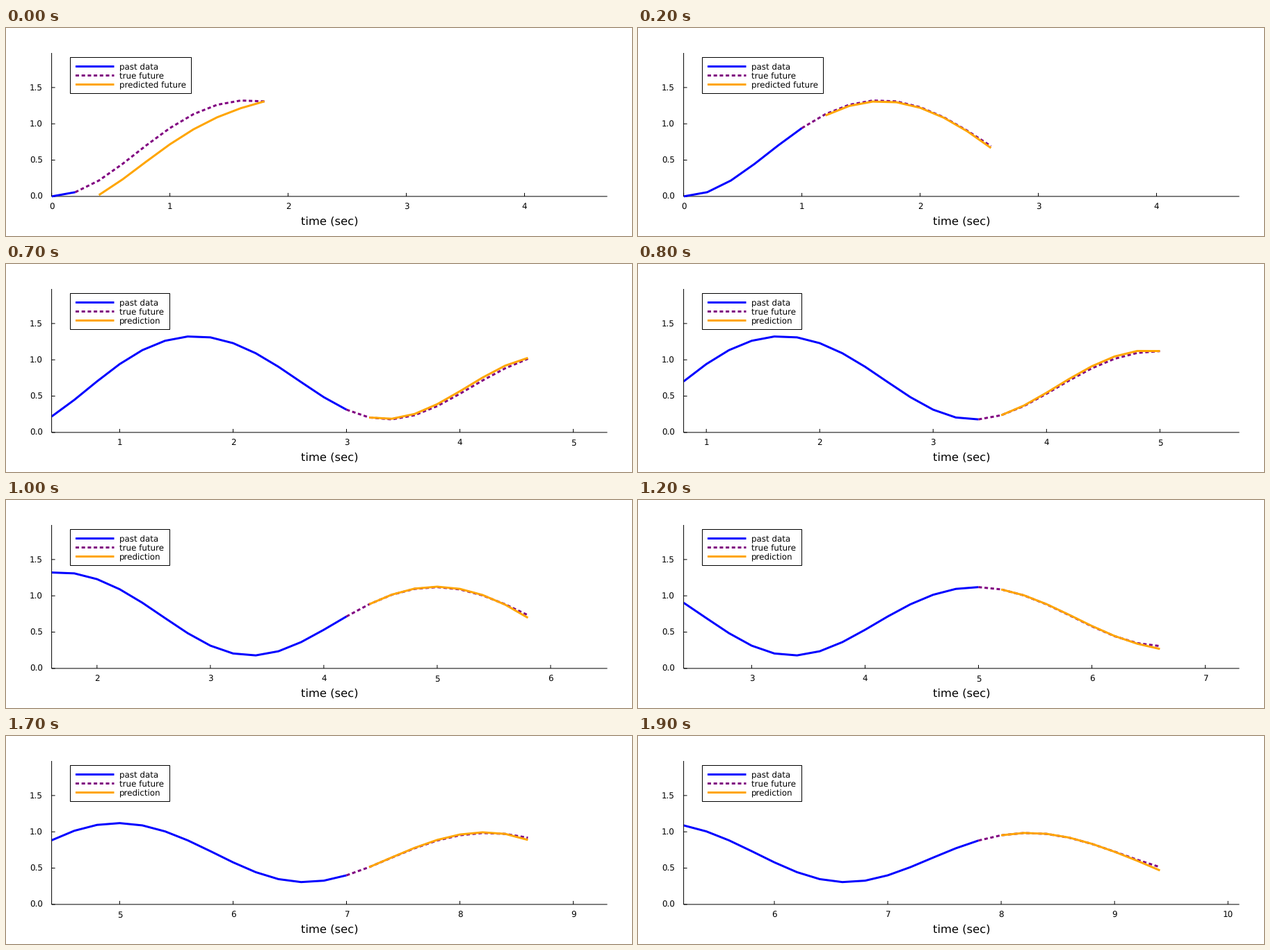
These frames come from a looping animation (900 px wide and 300 px high, 2 s). A matplotlib script:

```python
import math
import numpy as np
import matplotlib.pyplot as plt
from matplotlib.animation import FuncAnimation
from matplotlib.patches import Rectangle

W, H, DPI = 900, 300, 100
FRAMES, INTERVAL = 20, 100
LEFT, RIGHT, TOP, BASE = 65.6, 864.5, 36, 242.9
UNIT = 104.7            # pixels per unit of y
DT, AHEAD = 0.2, 8      # sample step and samples forecast
BLUE, PURPLE, ORANGE = "#0000ff", "#800080", "#ffa500"


def pt(pixels):
    return pixels * 72 / DPI


def swing(count, torque=3.0, gravity=4.905, drag=0.2, sub=20):
    """Damped pendulum starting at rest under a constant torque (RK4)."""
    def rate(s):
        return np.array([s[1], torque - gravity * math.sin(s[0]) - drag * s[1]])

    h = DT / sub
    state, angles = np.zeros(2), [0.0]
    for _ in range(count - 1):
        for _ in range(sub):
            a = rate(state)
            b = rate(state + h / 2 * a)
            c = rate(state + h / 2 * b)
            d = rate(state + h * c)
            state = state + h / 6 * (a + 2 * b + 2 * c + d)
        angles.append(state[0])
    return np.array(angles)


truth = swing(2 * FRAMES + AHEAD)
times = DT * np.arange(len(truth))


def forecast_error(i, now):
    """Poor first guess that quickly gives way to a small drift and end drop."""
    u = np.linspace(0, 1, AHEAD)
    guess = -(0.2 + 0.1 * u) * (1 - u**3)
    phase = 2 * math.pi * (now - 3) / 3.28
    drift = 0.061 * math.exp(-0.18 * now) * (1 + 0.75 * math.cos(phase))
    untrained = 0.3**i
    return untrained * guess + (1 - untrained) * (drift * u - 0.05 * u**7)


plt.rcParams["font.family"] = "DejaVu Sans"
plt.rcParams["text.hinting"] = "none"
fig = plt.figure(figsize=(W / DPI, H / DPI), dpi=DPI, facecolor="white")
ax = fig.add_axes([0, 0, 1, 1])
ax.set_xlim(0, W)
ax.set_ylim(H, 0)
ax.axis("off")


def stroke(xs, ys, color="black", width=1, z=2, **kw):
    return ax.plot(xs, ys, color=color, lw=pt(width), zorder=z, snap=False,
                   solid_capstyle="butt", dash_capstyle="butt",
                   solid_joinstyle="round", dash_joinstyle="round", **kw)[0]


def label(x, y, text, size=11.9, ha="left", z=2):
    return ax.text(x, y, text, fontsize=pt(size), ha=ha, va="baseline", zorder=z)


# Axes
stroke([LEFT, LEFT], [TOP, BASE])
stroke([LEFT, RIGHT], [BASE, BASE])
for value in (0, 0.5, 1, 1.5):
    y = BASE - UNIT * value
    stroke([LEFT, LEFT + 5], [y, y])
    label(53, y + 4.4, f"{value:.1f}", ha="right")
label((LEFT + RIGHT) / 2, 284, "time (sec)", 16.4, "center")
x_ticks = [(stroke([], []), label(0, 261.4, "", ha="center")) for _ in range(5)]

# Curves
DASH = {"linestyle": (0, (1.67, 1.23))}
STYLES = [(BLUE, {}), (PURPLE, DASH), (ORANGE, {})]
window = Rectangle((LEFT, TOP), RIGHT - LEFT, BASE - TOP + 2, transform=ax.transData)
curves = [stroke([], [], color, 3, 3 + n, **kw)
          for n, (color, kw) in enumerate(STYLES)]
for curve in curves:
    curve.set_clip_path(window)

# Legend
frame_box = Rectangle((92.5, 42.5), 174, 52, fc="white", ec="black",
                      lw=pt(1), zorder=7, snap=False)
ax.add_patch(frame_box)
names = []
for n, ((color, kw), text) in enumerate(zip(STYLES, ("past data", "true future", ""))):
    y = 55.5 + 13 * n
    stroke([100, 155.5], [y, y], color, 3, 8, **kw)
    names.append(label(163, y + 4.5, text, z=8))


def draw(i):
    now = 1 + 2 * i
    early = i <= 5
    lo = 0 if early else max(0, times[now] - 2.6)
    hi = 4.7 if early else lo + 4.9
    scale = (RIGHT - LEFT) / (hi - lo)

    def place(curve, first, last, shift=0):
        part = slice(first, last + 1)
        curve.set_data(LEFT + scale * (times[part] - lo),
                       BASE - UNIT * (truth[part] + shift))

    place(curves[0], max(0, now - 13), now)
    place(curves[1], now, now + AHEAD)
    place(curves[2], now + 1, now + AHEAD, forecast_error(i, times[now]))

    for n, (tick, text) in enumerate(x_ticks, math.ceil(lo - 1e-9)):
        x = LEFT + scale * (n - lo)
        tick.set_data([x, x], [BASE, BASE - 5])
        text.set_x(x)
        text.set_text(str(n))
        tick.set_visible(n <= hi)
        text.set_visible(n <= hi)

    names[2].set_text("predicted future" if early else "prediction")
    frame_box.set_width(174 if early else 143)
    return curves


anim = FuncAnimation(fig, draw, frames=FRAMES, interval=INTERVAL,
                     init_func=lambda: draw(0), repeat=True, repeat_delay=0)
plt.show()
```
